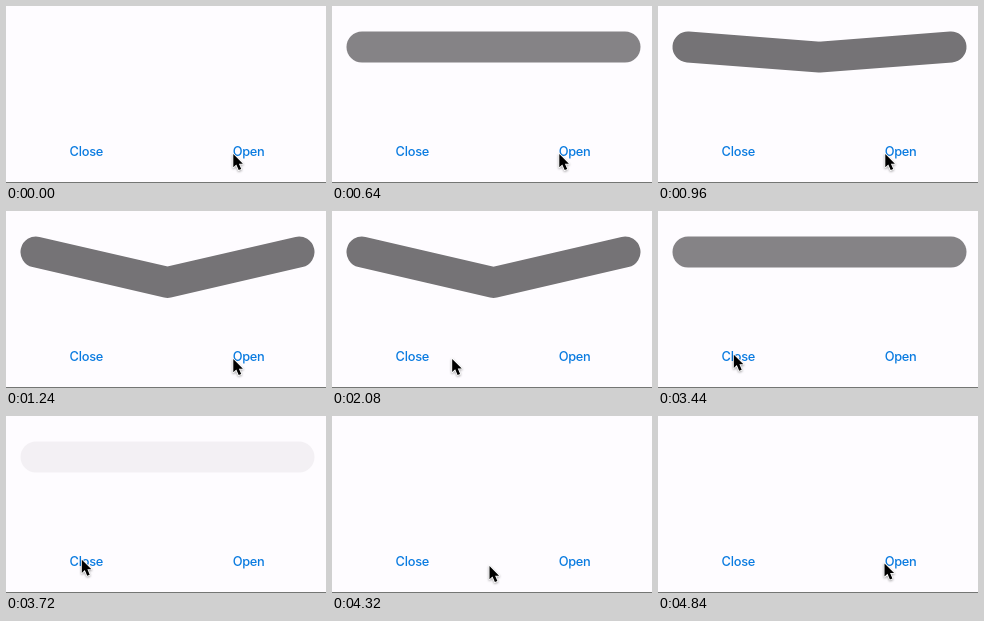
These frames come from a looping animation (320 by 177 pixels, 4880 ms). An HTML page:

```html
<!DOCTYPE html>
<html lang="en">
<head>
<meta charset="utf-8">
<title>Bending handle</title>
<style>
  html, body { margin: 0; width: 100%; height: 100%; overflow: hidden; background: #fefcff; }
  svg { display: block; width: 100vw; height: 100vh; }
  text { font: 500 12.8px Inter, "Liberation Sans", sans-serif; letter-spacing: -.25px; fill: #0a7be0; text-anchor: middle; }
  #bar { fill: none; stroke: #757376; stroke-width: 31; stroke-linecap: round; stroke-linejoin: round; }
  #cursor { filter: drop-shadow(0 1px 1px rgba(0, 0, 0, .35)); }
  #cursor path { fill: #000; stroke: #fff; stroke-width: 1.6; paint-order: stroke; stroke-linejoin: round; }
</style>
</head>
<body>
<svg viewBox="0 0 320 177">
  <rect width="320" height="177" fill="#fefcff"/>
  <rect y="176" width="320" height="1" fill="#747674"/>
  <path id="bar"/>
  <text x="80.3" y="150.1">Close</text>
  <text id="open" x="242.6" y="150.1">Open</text>
  <g id="cursor"><path d="M0 0V13.2L3 10.4L5.4 16L7.9 15L5.6 9.6H9.6Z"/></g>
</svg>
<script>
const LOOP = 4880, STEP = 40, DURATION = 500;
const FADE_HOLD = 3720, HIDE = 4120;
const $ = id => document.getElementById(id);
const bar = $('bar'), openLabel = $('open'), cursor = $('cursor');

const home = { x: 227.3, y: 148.1 };
const moves = [
  { start: 1680, end: 2400, x: 75.8, y: 143.7 },
  { start: 4080, end: 4600, x: 220, y: 149 },
  { start: 4640, end: 4840, x: 226.5, y: 147.4 }
];

const clamp = v => Math.min(1, Math.max(0, v));
const progress = (t, start, end) => clamp((t - start) / (end - start));

// cubic-bezier(.42, 0, .58, 1)
function ease(p) {
  let lo = 0, hi = 1;
  for (let i = 0; i < 20; i++) {
    const s = (lo + hi) / 2, r = 1 - s;
    if (1.26 * s * r * r + 1.74 * s * s * r + s * s * s < p) lo = s; else hi = s;
  }
  return lo * lo * (3 - 2 * lo);
}

const ramp = (t, start) => ease(progress(t, start, start + DURATION));

// Each move is eased and sags a little below the straight line.
function pointerAt(t) {
  let { x, y } = home;
  for (const m of moves) {
    const p = ease(progress(t, m.start, m.end) ** 0.8);
    const dx = m.x - x, dy = m.y - y;
    x += dx * p;
    y += dy * p + Math.abs(dx) * 0.024 * Math.sin(Math.PI * p);
    if (t < m.end) break;
  }
  return [x, y];
}

const barOpacity = t =>
  t < HIDE ? ramp(t, 260) - ramp(Math.min(t, FADE_HOLD), 3320) : 0;

const bend = t => ramp(t, 760) - ramp(t, 2800);

const pressOpacity = t => t < 280 ? 1 : 0.45 + 0.55 * progress(t, 280, 480);

function draw(now) {
  const t = Math.floor(now % LOOP / STEP) * STEP;
  bar.setAttribute('d', `M30 41L161.5 ${41 + 30.5 * bend(t)}L293 41`);
  bar.setAttribute('opacity', barOpacity(t));
  openLabel.setAttribute('opacity', pressOpacity(t));
  cursor.setAttribute('transform', `translate(${pointerAt(t)})`);
}

const start = performance.now();
function tick() {
  draw(performance.now() - start);
  requestAnimationFrame(tick);
}
tick();
</script>
</body>
</html>
```
